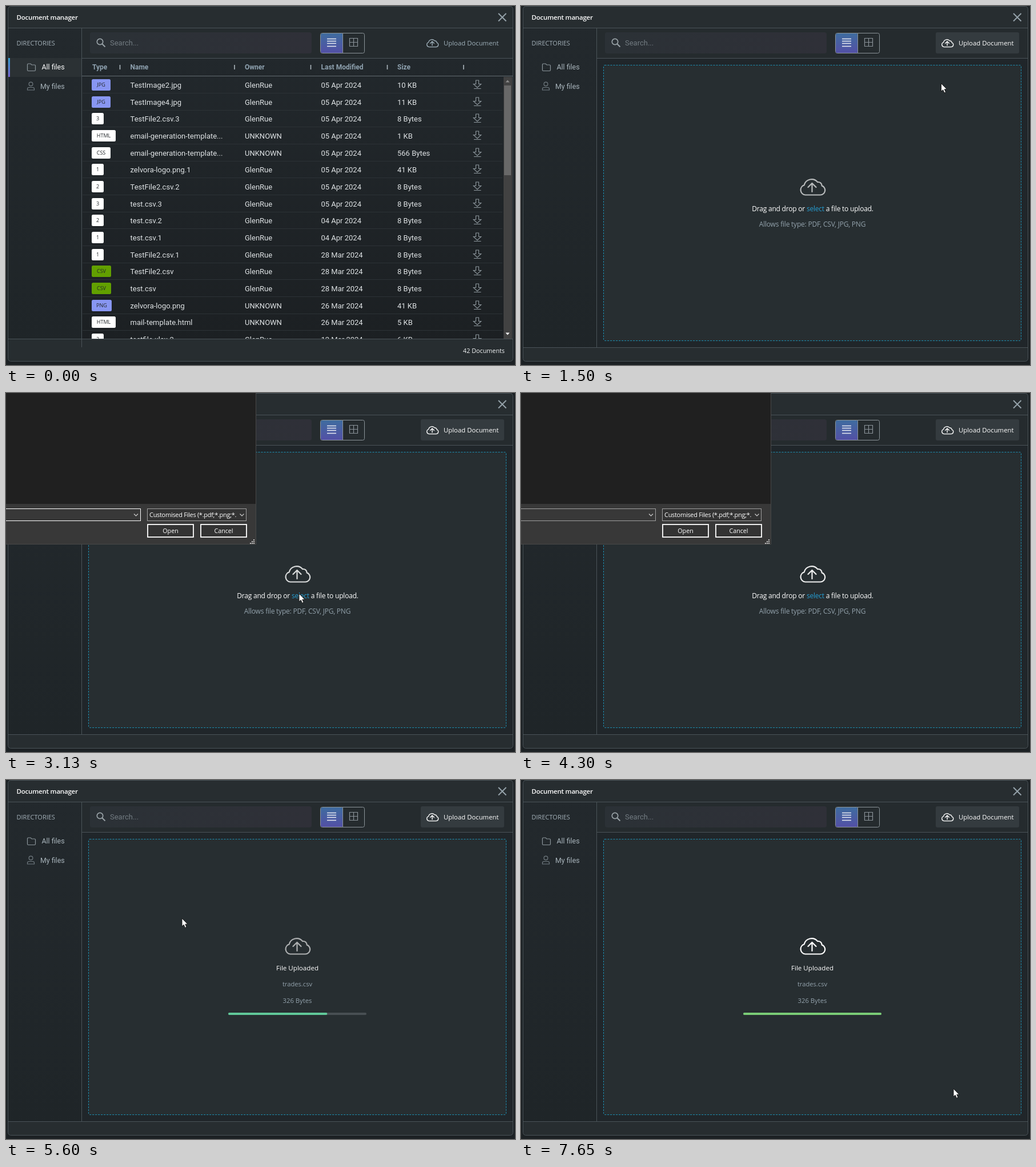
An HTML page that plays this animation: 891 by 628 pixels, repeating every 8000 ms.

```html
<!DOCTYPE html>
<html lang="en">
<head>
<meta charset="utf-8">
<title>Document manager</title>
<style>
html, body { margin: 0; width: 100%; height: 100%; overflow: hidden; background: #1c2124; }
svg { display: block; width: 891px; height: 628px; }
.r { font-family: Roboto, sans-serif; }
.o { font-family: "Open Sans", sans-serif; }
</style>
</head>
<body>
<svg id="stage" viewBox="0 0 891 628" xmlns="http://www.w3.org/2000/svg"></svg>
<script>
const LOOP = 8000;
const stage = document.getElementById('stage');
const LINE = '#4a5358';

const rect = (x, y, w, h, fill, more = '') =>
  `<rect x="${x}" y="${y}" width="${w}" height="${h}" fill="${fill}" ${more}/>`;
const path = (d, stroke, width = 1, more = '') =>
  `<path d="${d}" fill="none" stroke="${stroke}" stroke-width="${width}" ${more}/>`;
const text = (x, y, str, size, fill, font = 'r', more = '') =>
  `<text x="${x}" y="${y}" class="${font}" font-size="${size}" fill="${fill}" ${more}>${str}</text>`;
const group = (id, body, more = '') => `<g id="${id}" ${more}>${body}</g>`;
const grad = (id, a, b, dir = 'x2="0" y2="1"') =>
  `<linearGradient id="${id}" ${dir}><stop stop-color="${a}"/><stop offset="1" stop-color="${b}"/></linearGradient>`;
const mid = 'text-anchor="middle"';

const cloud = (x, y, scale, width, more) => `<g transform="translate(${x} ${y}) scale(${scale})" fill="none"
  stroke-width="${width}" stroke-linejoin="round" stroke-linecap="round" ${more}>
  <path d="M9.5 30A8.8 8.8 0 0 1 7.6 12.9A13.6 13.6 0 0 1 31.2 7.6C35 6.9 38.6 9.6 38.7 13.9A8.3 8.3 0 0 1 36 30Z"/>
  <path d="M21.5 24.5V10M14.5 16.5L21.5 9.5L28.5 16.5"/></g>`;

// Type, name, owner (empty = unknown), date, size
const files = `JPG|TestImage2.jpg|GlenRue|05 Apr|10 KB
JPG|TestImage4.jpg|GlenRue|05 Apr|11 KB
3|TestFile2.csv.3|GlenRue|05 Apr|8 Bytes
HTML|email-generation-template....||05 Apr|1 KB
CSS|email-generation-template....||05 Apr|566 Bytes
1|zelvora-logo.png.1|GlenRue|05 Apr|41 KB
2|TestFile2.csv.2|GlenRue|05 Apr|8 Bytes
3|test.csv.3|GlenRue|05 Apr|8 Bytes
2|test.csv.2|GlenRue|04 Apr|8 Bytes
1|test.csv.1|GlenRue|04 Apr|8 Bytes
1|TestFile2.csv.1|GlenRue|28 Mar|8 Bytes
CSV|TestFile2.csv|GlenRue|28 Mar|8 Bytes
CSV|test.csv|GlenRue|28 Mar|8 Bytes
PNG|zelvora-logo.png||26 Mar|41 KB
HTML|mail-template.html||26 Mar|5 KB
2|testfile.xlsx.2|GlenRue|12 Mar|6 KB`.split('\n').map(s => s.split('|'));
const badges = { JPG: [33, '#8896f2'], PNG: [35, '#8896f2'], CSV: [34, '#62a000'], HTML: [42, '#fff'], CSS: [33, '#fff'] };
const PITCH = 29.67;
const rowY = i => 138 + i * PITCH;

function row([type, name, owner, date, size], i) {
  const y = rowY(i), b = Math.round(y + 5);
  const [w, fill] = badges[type] || [21, '#fff'];
  const cell = (x, s) => text(x, b, s, 13, '#dfe3e5');
  return rect(150, Math.round(y - 10), w, 20, fill, 'rx="2.5"') +
    text(150 + w / 2, Math.round(y + 3), type, 9, '#22272a', 'o', mid) +
    cell(217.5, name.replace('....', '...')) + cell(418, owner || 'UNKNOWN') +
    cell(551.5, date + ' 2024') + cell(685, size) +
    path(`M822.5 ${b - 13}h5v6.5h4.2l-6.7 6.2l-6.7 -6.2h4.2zM819 ${b + 1.5}h12.5`, '#8d979d', 1.1) +
    path(`M134 ${Math.round(y + 15) - .5}H869`, '#2c3236');
}

function table() {
  const heads = [[151, 'Type'], [217.5, 'Name'], [418, 'Owner'], [551.5, 'Last Modified'], [685, 'Size']];
  return rect(133, 92, 754, 490, 'url(#dark)') +
    `<g clip-path="url(#rows)">` +
    rect(150, 0, 719, 29, 'url(#hover)', 'id="hoverRow"') + files.map(row).join('') + '</g>' +
    heads.map(([x, s]) => text(x, 111, s, 12, '#8fa2b0', 'r', 'font-weight="600"')).join('') +
    [199.5, 400, 533.5, 667.5, 801].map(x => path(`M${x} 103V111`, '#aeb8be', 1.6)).join('') +
    path('M133 122.5H887', '#626b70') +
    rect(871, 124, 15, 458, '#424242') + rect(872, 139, 12, 157, '#686868') +
    '<path d="M874.5 133.5h7l-3.5-4z" fill="#8c8c8c"/><path d="M874.5 571.5h7l-3.5 4z" fill="#fff"/>' +
    rect(4, 583, 883, 38, '#272d30', 'rx="5"') + path('M4 582.5H887', LINE) +
    text(873, 607, '42 Documents', 10.8, '#f2f4f5', 'o', 'text-anchor="end"');
}

function sidebar() {
  const folder = 'M37.5 112V102.5Q37.5 101 39 101H43L45 103H50Q51.5 103 51.5 104.5V112Q51.5 113.5 50 113.5H39Q37.5 113.5 37.5 112Z';
  return group('activeItem', rect(4, 91, 128, 33, '#2b3134') + rect(4, 91, 3, 33, 'url(#bar)')) +
    text(18.5, 69, 'DIRECTORIES', 11, '#a3b0b8', 'o') +
    path(folder, '#8b959b', 1.2) +
    text(62.5, 111, 'All files', 12.4, '#a9b5bc', 'r', 'id="allFiles"') +
    '<circle cx="43.5" cy="136.5" r="3.4" fill="none" stroke="#717b81" stroke-width="1.2"/>' +
    path('M37.5 147V145Q37.5 142.5 40 142.5H47Q49.5 142.5 49.5 145V147Z', '#717b81', 1.2) +
    text(60, 145, 'My files', 12.4, '#a9b5bc');
}

function toolbar() {
  return rect(147, 46, 388, 37, 'url(#field)', 'rx="4"') +
    '<circle cx="164.5" cy="62.5" r="5.2" fill="none" stroke="#9aa3a8" stroke-width="1.7"/>' +
    path('M168.5 66.5L173.5 71.5', '#9aa3a8', 2) +
    text(182, 69, 'Search...', 13, '#727b81') +
    rect(550.5, 47.5, 77, 35, '#252b2e', 'rx="3" stroke="#8b9499"') +
    rect(551, 48, 38.5, 34, 'url(#active)', 'rx="2.5"') + path('M589.5 48V82', '#8b9499') +
    path('M562 57.5H578M562 61.5H578M562 65.5H578M562 70.5H578', '#e9ecf2', 1.3) +
    path('M601.5 56.5H615.5V70.5H601.5ZM608.5 56.5V70.5M601.5 63.5H615.5', '#899298', 1.2) +
    rect(726, 46, 146, 37, '#343b3f', 'rx="3" id="pressed"') +
    group('upload', cloud(736, 57.5, .47, 2.9, 'stroke="currentColor"') +
      text(766, 69, 'Upload Document', 11.35, 'currentColor', 'o'));
}

function dropzone() {
  const big = 'letter-spacing="-.21" ' + mid;
  return rect(133, 92, 754, 505, '#20262a') +
    rect(144.5, 103.5, 731, 482, '#272e31', 'rx="2" stroke="#1c8fb2" stroke-dasharray="3 2"') +
    group('bigCloud', cloud(488, 0, 1, 2.2, 'stroke="#fff"')) +
    group('prompt', text(510.5, 359, 'Drag and drop or <tspan fill="#259dd2">select</tspan> a file to upload.', 12, '#fff', 'o', big) +
      text(510, 386, 'Allows file type: PDF, CSV, JPG, PNG', 12, '#93a2ac', 'o', big)) +
    group('done', text(510, 333, 'File Uploaded', 11.6, '#fff', 'o', mid) +
      text(510, 361, 'trades.csv', 11.2, '#93a2ac', 'o', mid) +
      text(510, 390, '326 Bytes', 11.3, '#93a2ac', 'o', mid) +
      rect(389, 407, 242, 4, '#484f53', 'rx="2"') + rect(389, 407, 0, 4, '', 'rx="2" id="progress"') +
      rect(473, 320, 1, 16, '#e6e9ea', 'id="caret"')) +
    rect(4, 598, 883, 23, '#272d30', 'rx="5"') + path('M4 597.5H887', LINE);
}

function dialog() {
  const chevron = x => path(`M${x - 3.5} 211.5l3.5 3.5l3.5 -3.5`, '#d0d0d0', 1.1);
  const dots = [[434, 256], [431, 259], [434, 259], [428, 262], [431, 262], [434, 262]];
  const button = (x, s, id) => rect(x + 1, 230, 80, 22, '#333', `stroke="#fff" stroke-width="1.8" id="${id}"`) +
    text(x + 41, 245, s, 10.7, '#fff', 'o', mid);
  return rect(0, 0, 438, 265, '#383838') + rect(0, 0, 438, 194, '#202020') +
    path('M437.5 0V264.5H0', '#484848') +
    rect(-5, 202.5, 240.5, 21, '#383838', 'id="nameField"') + chevron(227.5) +
    rect(247.5, 202.5, 173, 21, '#333', 'stroke="#a0a0a0"') +
    text(251, 217, 'Customised Files (*.pdf;*.png;*.', 11, '#fff', 'o', 'letter-spacing="-.3"') + chevron(413) +
    button(247, 'Open', 'openBtn') + button(340, 'Cancel', 'cancelBtn') +
    dots.map(([x, y]) => rect(x - 1, y, 2, 2, '#c4c4c4')).join('');
}

const arrow = 'M0 0V14L3.2 11.2L5.5 16.4L8 15.3L5.8 10.2H10Z';
const hand = 'M-1.7 1.6C-1.7 -.5 1.7 -.5 1.7 1.6V7.5C3 6.8 4.4 7.2 4.6 8.4C6 7.8 7.2 8.4 7.4 9.4C8.8 9 9.8 9.8 9.8 11V15.5C9.8 17 8 18.5 8 21H-.5C-.8 19 -4.3 15.5 -4.8 13.2C-5.2 11 -3.2 10.6 -1.7 13Z';

stage.innerHTML = '<defs>' +
  grad('dark', '#22282c', '#1c2023') + grad('side', '#23292d', '#1f2528') +
  grad('field', '#2b3136', '#2f3038', '') + grad('active', '#3f6c9f', '#5350a6') +
  grad('bar', '#2f9fd0', '#7a62d8') + grad('hover', 'rgba(60,68,73,0)', 'rgba(60,68,73,.7)', '') +
  '<clipPath id="rows"><rect x="133" y="123" width="754" height="459"/></clipPath></defs>' +
  rect(0, 0, 891, 628, '#1c2124') +
  rect(3.5, .5, 884, 621, '#272d30', 'rx="5"') +
  rect(4, 39, 129, 559, 'url(#side)') + rect(133, 39, 754, 53, '#252b2e') +
  text(18.5, 24, 'Document manager', 11.5, '#fff', 'o', 'font-weight="600" letter-spacing="-.2"') +
  path('M862 13L875.5 26.5M875.5 13L862 26.5', '#94a1a9', 2) +
  toolbar() + sidebar() +
  group('list', table()) + group('zone', dropzone()) +
  path('M4 38.5H887M133 91.5H887', LINE) +
  path('M132.5 39V582M132.5 582V597', LINE) +
  rect(3.5, .5, 884, 621, 'none', `rx="5" stroke="${LINE}"`) +
  group('dialog', dialog()) +
  '<circle id="click" r="10.5" fill="#c3bd24" opacity=".88"/>' +
  '<path id="cursor" fill="#fff" stroke="#111" stroke-width=".9" stroke-linejoin="round"/>';

const el = {};
stage.querySelectorAll('[id]').forEach(n => el[n.id] = n);
const set = (id, attrs) => { for (const k in attrs) el[id].setAttribute(k, attrs[k]); };
const show = (id, on) => set(id, { visibility: on ? 'inherit' : 'hidden' });
const clamp = v => Math.max(0, Math.min(1, v));
const part = (t, a, b) => clamp((t - a) / (b - a));
const ease = f => f * f * (3 - 2 * f);
const mix = (a, b, f) => a + (b - a) * f;

// start, end, from x, y, to x, y
const moves = [
  [220, 580, 860, 573, 801, 72],
  [1260, 2040, 801, 72, 513, 351],
  [3130, 3580, 513, 351, -20, 60],
  [4300, 4760, -20, 60, 308, 242],
  [6810, 7470, 308, 242, 757, 540]
];
const clicks = [[800, 1080], [2400, 2680], [4860, 4990]];

function pointer(t) {
  const m = moves.filter(k => t >= k[0]).pop();
  if (!m) return [-50, -50];
  const f = ease(part(t, m[0], m[1]));
  return [mix(m[2], m[4], f), mix(m[3], m[5], f)];
}

function glow(t) {
  const falling = ease(part(t, 860, 2100)) + ease(part(t, 4090, 5050));
  const rising = ease(part(t, 2280, 3580)) + ease(part(t, 5210, 6120));
  return 1 - .62 * (falling - rising);
}

function draw(t) {
  const [x, y] = pointer(t);
  const within = (l, top, r, b) => x >= l && x <= r && y >= top && y <= b;
  const zone = t >= 980, done = t >= 5210;

  show('list', !zone);
  show('zone', zone);
  show('activeItem', !zone);
  set('allFiles', { fill: zone ? '#a9b5bc' : '#fff' });
  show('pressed', t >= 800);
  const overUpload = within(726, 46, 872, 83);
  set('upload', { color: overUpload || t >= 800 ? '#fff' : '#9fb0ba' });

  const i = Math.floor((y - 123) / PITCH);
  set('hoverRow', { y: rowY(i) - 15 });
  show('hoverRow', !zone && within(133, 123, 869, 582));

  set('bigCloud', { transform: `translate(0 ${done ? 274.5 : 300.5})`, opacity: glow(t) });
  show('prompt', zone && !done);
  show('done', done);
  const p = 1 - Math.pow(1 - part(t, 5210, 5840), 1.3);
  const g = part(p, .7, 1);
  set('progress', {
    width: 242 * p,
    fill: `rgb(${mix(94, 122, g)},${mix(200, 204, g)},${mix(155, 118, g)})`
  });
  show('caret', done && t >= 6120 && Math.floor((t - 6120) / 510) % 2 === 0);

  set('dialog', { opacity: part(t, 2947, 3010) * (1 - part(t, 4985, 5040)) });
  set('nameField', { stroke: t < 4090 ? '#fff' : '#a0a0a0' });
  const overOpen = t > 4300 && within(247, 229, 329, 253);
  set('openBtn', { fill: overOpen ? '#666' : '#333' });

  const overLink = t < 2900 && within(499, 345, 530, 362);
  set('cursor', { d: overUpload || overLink ? hand : arrow, transform: `translate(${x} ${y})` });
  set('click', { cx: x, cy: y - 1 });
  show('click', clicks.some(([a, b]) => t >= a && t < b));
}

const begin = performance.now();
function tick() {
  draw((performance.now() - begin) % LOOP);
  requestAnimationFrame(tick);
}
tick();
</script>
</body>
</html>
```
